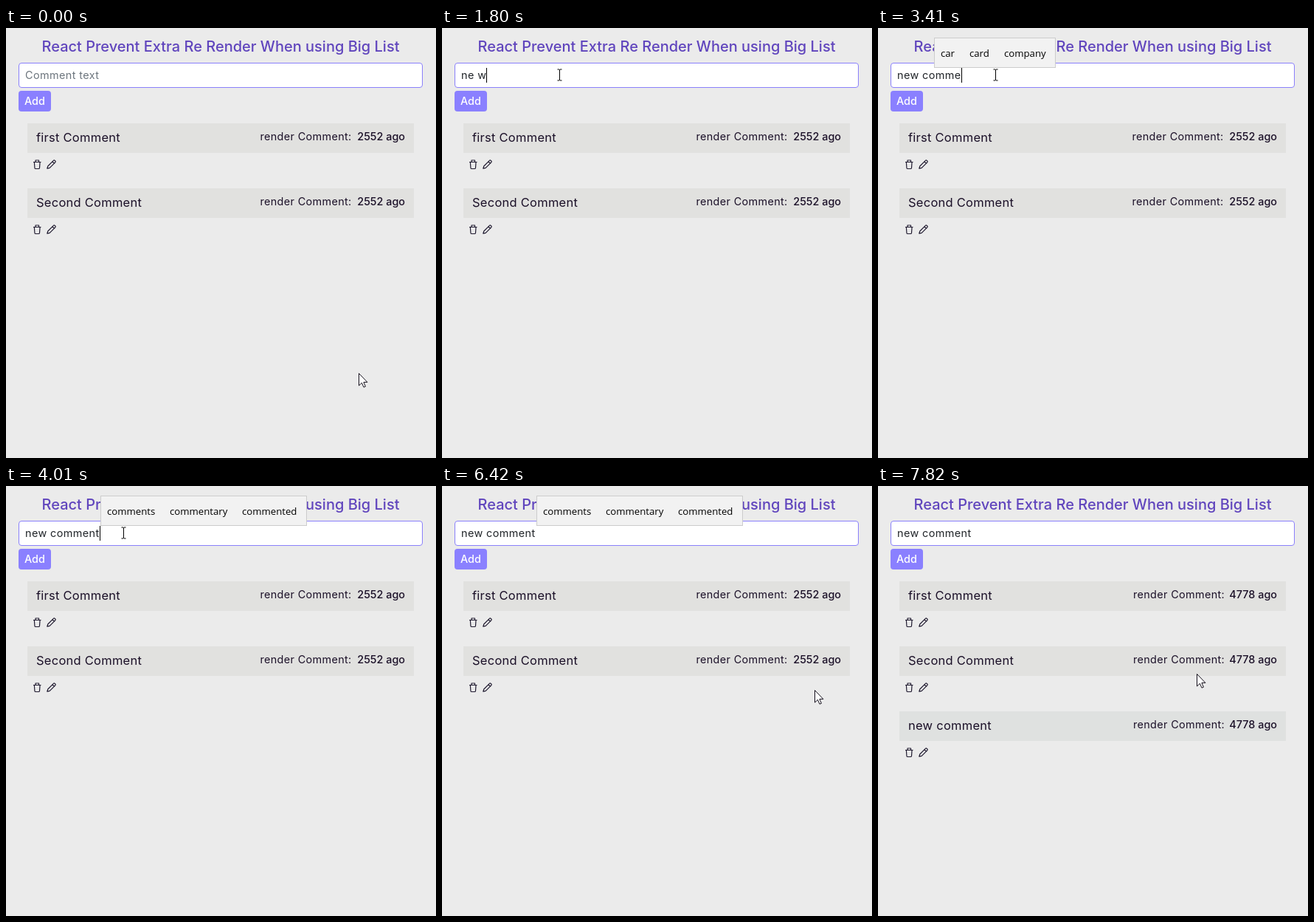
Recreate the animation shown at these times as an HTML page. Size 583 by 582 pixels, loop 8000 ms.

```html
<!DOCTYPE html>
<html lang="en">
<head>
<meta charset="utf-8">
<title>Comment list</title>
<style>
  html, body { margin: 0; width: 100%; height: 100%; overflow: hidden; background: #ebebeb; }
  svg { display: block; width: 100vw; height: 100vh; }
  text { font-family: Inter, "Open Sans", sans-serif; font-size: 14.4px; fill: #1b1028; white-space: pre; }
  .title { font-size: 20px; font-weight: 500; fill: #6045bd; text-anchor: middle; }
  .field { letter-spacing: .4px; fill: #212529; }
  .hint { fill: #6c757d; }
  .button { font-weight: 500; fill: #fff; }
  .name { font-size: 16.5px; letter-spacing: .25px; }
  .label { letter-spacing: .35px; }
  .count { font-weight: 500; text-anchor: end; }
  .icon { fill: none; stroke: #201b30; stroke-width: 1.2; stroke-linejoin: round; }
  .popup text { font-family: "Open Sans", "Noto Sans", sans-serif; font-size: 13.2px; fill: #000; }
  .popup rect { fill: #f2f2f2; stroke: #ccc; }
</style>
</head>
<body>
<svg viewBox="0 0 583 582">
  <rect width="583" height="582" fill="#ebebeb"/>
  <text class="title" x="291" y="32">React Prevent Extra Re Render When using Big List</text>
  <rect x="17.5" y="47.5" width="547" height="33" rx="3.5" fill="#fff" stroke="#8a80fb"/>
  <text id="field" class="field" x="26" y="69"></text>
  <rect id="caret" y="54" width="1" height="20" fill="#000"/>
  <rect x="17" y="85" width="44" height="28" rx="4" fill="#8a80ff"/>
  <text class="button" x="25" y="104">Add</text>
  <g id="list"></g>
  <g id="popups"></g>
  <path id="arrow" d="M.5.5V17l3.9-3.7 2.6 5.9 2.4-1-2.5-5.8h5z" fill="#fff" stroke="#15101c"/>
  <path id="beam" d="M-3-7.5h2.5l.5.5.5-.5H3M0-7V7M-3 7.5h2.5L0 7l.5.5H3" fill="none" stroke="#000"/>
</svg>
<script>
const LOOP = 8000, ADDED = 7220, BLINK = 530, LAST_KEY = 3700, FOCUS = 800;
const $ = id => document.getElementById(id);

// [time, typed text]
const typing = [
  [0, ""], [1200, "n"], [1400, "ne"], [1600, "ne "], [1800, "ne w"], [2000, "ne"],
  [2400, "new"], [2600, "new "], [2800, "new c"], [3000, "new co"], [3200, "new com"],
  [3410, "new comme"], [3610, "new comment"]
];

// [time, x, y] of the pointer
const pointer = [
  [0, 478, 467], [200, 458, 420], [400, 330, 215], [600, 192, 23], [800, 159, 63],
  [4410, 232, 130], [4610, 340, 203], [4810, 478, 228], [5010, 555, 226], [5210, 540, 238],
  [5410, 516, 245], [5610, 508, 243], [5810, 500, 240], [6010, 494, 247], [6210, 500, 262],
  [6420, 505, 276], [6610, 497, 272], [6810, 480, 264], [7020, 460, 257], [7220, 444, 254],
  [7420, 432, 254]
];

const popups = [
  { from: 2000, to: 2400, x: 43, right: 199, words: [[52, "need"], [103, "next"], [151, "never"]] },
  { from: 3000, to: 3810, x: 76, right: 241, words: [[85, "car"], [124, "card"], [171, "company"]] },
  { from: 3810, to: ADDED, x: 128, right: 408, words: [[137, "comments"], [222, "commentary"], [320, "commented"]] }
];

const comment = (name, i) => `
  <g transform="translate(0 ${i * 88})">
    <rect x="29" y="129" width="524" height="40" fill="${i < 2 ? "#e1e1df" : "#dfe1e0"}"/>
    <text class="name" x="41" y="154">${name}</text>
    <text class="label" y="152">render Comment:</text>
    <text class="count" x="541" y="152"></text>
    <path class="icon" d="M37 181.5h10.5M40 181v-2h4.5v2M38.4 182l.5 7.2q.1 1.3 1.3 1.3h4q1.2 0 1.3-1.3l.5-7.2"/>
    <path class="icon" d="M55.8 190.2l1-3.2 7.6-7.6q.9-.9 1.8 0l.6.6q.9.9 0 1.8l-7.6 7.6zM63 181l2.4 2.4"/>
  </g>`;

$("list").innerHTML = ["first Comment", "Second Comment", "new comment"].map(comment).join("");
$("popups").innerHTML = popups.map(p => `
  <g class="popup">
    <rect x="${p.x + .5}" y="13.5" width="${p.right - p.x - 1}" height="40"/>
    ${p.words.map(([x, word]) => `<text x="${x}" y="39">${word}</text>`).join("")}
  </g>`).join("");

const items = [...$("list").children];
const labels = document.querySelectorAll(".label");
const counts = document.querySelectorAll(".count");
const popupNodes = [...$("popups").children];

const at = (steps, t) => steps.findLast(step => step[0] <= t);
const show = (node, on) => node.setAttribute("visibility", on ? "visible" : "hidden");
const setText = (node, value) => { if (node.textContent !== value) node.textContent = value; };

function caretOn(t) {
  if (t < FOCUS) return false;
  return t < LAST_KEY || Math.floor((t - LAST_KEY) / BLINK) % 2 === 0;
}

function draw(t) {
  const typed = at(typing, t)[1];
  const field = $("field");
  setText(field, typed || "Comment text");
  field.classList.toggle("hint", !typed);
  const end = typed ? field.getComputedTextLength() : 0;
  $("caret").setAttribute("x", Math.round(26 + end));
  show($("caret"), caretOn(t));

  const added = t >= ADDED;
  show(items[2], added);
  labels.forEach(node => node.setAttribute("x", added ? 346 : 344.5));
  counts.forEach(node => setText(node, added ? "4778 ago" : "2552 ago"));
  popups.forEach((p, i) => show(popupNodes[i], t >= p.from && t < p.to));

  const [, x, y] = at(pointer, t);
  const inField = y > 48 && y < 81;
  show($("arrow"), !inField);
  show($("beam"), inField);
  $("arrow").setAttribute("transform", `translate(${x} ${y})`);
  $("beam").setAttribute("transform", `translate(${x + .5} ${y + .5})`);
}

const start = performance.now();
function frame() {
  draw((performance.now() - start) % LOOP);
  requestAnimationFrame(frame);
}
frame();
</script>
</body>
</html>
```
